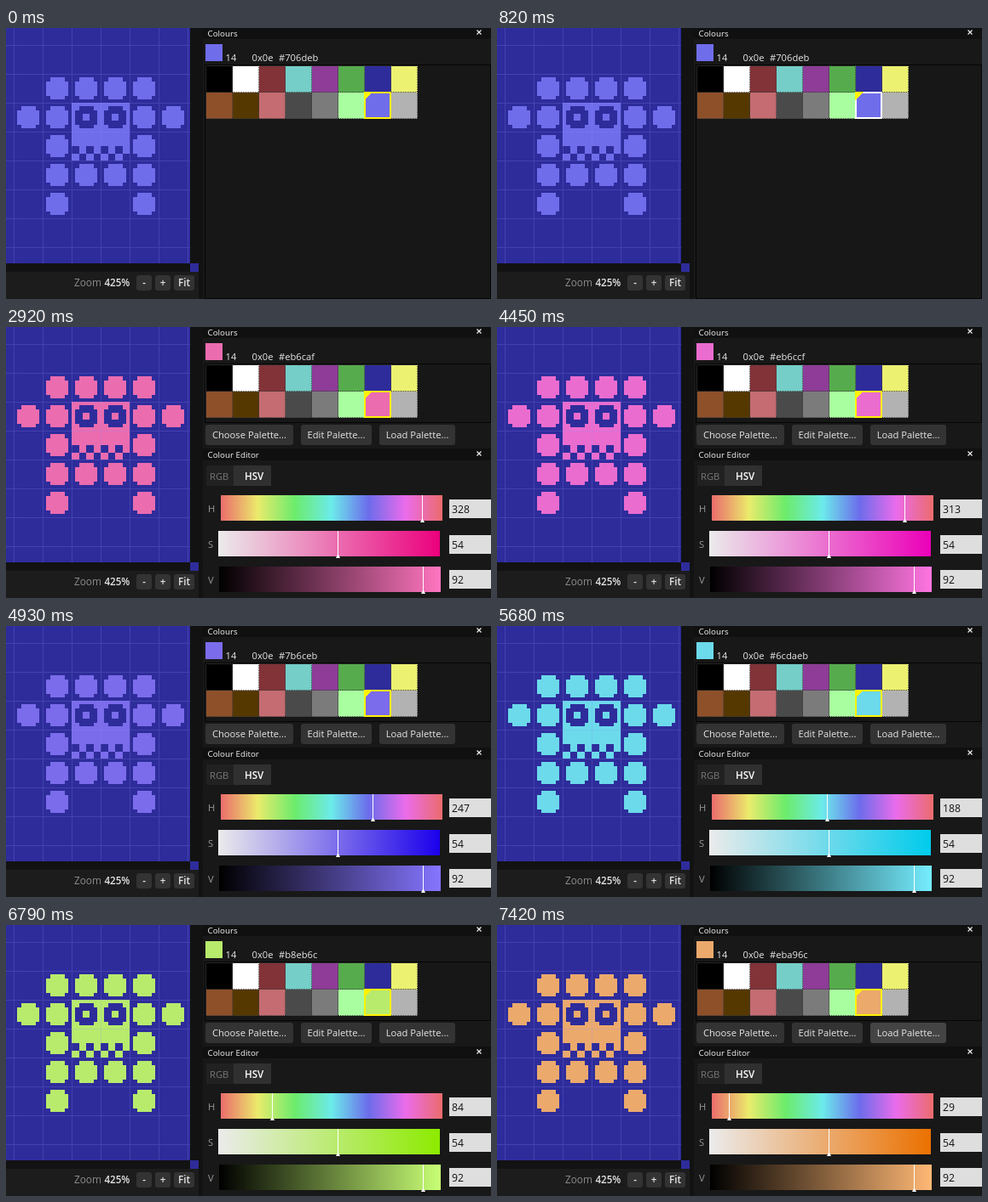
Recreate the animation shown at these times as an HTML page. Size 569x319 px, loop 8.89 s.

```html
<!DOCTYPE html>
<html lang="en">
<head>
<meta charset="utf-8">
<title>Palette editor</title>
<style>
html, body { margin: 0; width: 100%; height: 100%; overflow: hidden; background: #181818; }
svg { display: block; width: 100vw; height: 100vh; --c: #706deb; --pure: #0400eb; --bright: #7876ff; }
text { font: 11.2px "Open Sans", "Noto Sans", sans-serif; fill: #e6e6e6; white-space: pre; }
.title { font-size: 9.8px; fill: #f4f4f4; }
.strong { font-weight: 600; font-size: 11.6px; }
.dim { fill: #8c8c8c; font-size: 11.8px; }
.num { font-size: 12.2px; fill: #111; }
.ink { fill: var(--c); }
.btn { fill: #333; }
.btn.hover { fill: #444; }
.crisp { shape-rendering: crispEdges; }
</style>
</head>
<body>
<svg id="stage" viewBox="0 0 569 319" preserveAspectRatio="none">
  <defs>
    <linearGradient id="hueFill"></linearGradient>
    <linearGradient id="satFill">
      <stop stop-color="#ebebeb"/><stop offset="1" style="stop-color:var(--pure)"/>
    </linearGradient>
    <linearGradient id="valFill">
      <stop stop-color="#000"/><stop offset="1" style="stop-color:var(--bright)"/>
    </linearGradient>
  </defs>
  <rect width="569" height="319" fill="#181818"/>

  <g class="crisp">
    <rect width="231" height="287" fill="#121212"/>
    <rect width="216" height="277" fill="#2e2c9b"/>
    <rect x="216" y="277" width="10" height="10" fill="#2e2c9b"/>
    <g id="sprite"></g>
    <path id="grid" stroke="#8f8df0" stroke-opacity=".22" fill="none"/>
    <rect y="287" width="226" height="32" fill="#1c1c1c"/>
    <rect x="226" width="5" height="319" fill="#121212"/>
  </g>
  <text class="dim" x="80" y="304">Zoom</text>
  <text class="strong" x="115.5" y="304">425%</text>
  <g id="zoomButtons"></g>

  <rect x="231" width="338" height="13" fill="#101010"/>
  <text class="title" x="236.5" y="10">Colours</text>
  <path class="close" d="M552.5 2.5l5 5m0-5l-5 5" stroke="#eee" stroke-width="1.2"/>
  <rect id="chip" class="crisp" x="234" y="19" width="20" height="20"/>
  <text id="index" x="257.5" y="38.5"></text>
  <text id="code" x="288.5" y="38.5"></text>
  <text id="hex" x="320" y="38.5"></text>
  <rect id="list" x="233.5" y="43.5" width="335" height="275" fill="#171717" stroke="#050505"/>
  <g id="swatches" class="crisp"></g>
  <g id="pick" class="crisp">
    <rect x="1" y="1" width="30" height="30" fill="none" stroke="#fff200" stroke-width="2"/>
    <path d="M0 0h10L0 10z" fill="#fff200"/>
  </g>

  <g id="editor">
    <g id="paletteButtons"></g>
    <rect x="231" y="143" width="338" height="14" fill="#101010"/>
    <text class="title" x="236.5" y="154">Colour Editor</text>
    <path d="M552.5 146.500l5 5m0-5l-5 5" stroke="#eee" stroke-width="1.2"/>
    <rect x="235" y="163" width="32" height="24" fill="#212121"/>
    <rect x="267" y="163" width="44" height="24" fill="#303030"/>
    <text x="239" y="179.500" style="fill:#777">RGB</text>
    <text class="strong" x="280" y="179.500" style="fill:#fff">HSV</text>
    <g id="sliders"></g>
  </g>
</svg>
<script>
const LOOP = 8890, TICK = 30, SAT = .54, VAL = .92;
const $ = id => document.getElementById(id);

function add(parent, tag, attrs, text) {
  const el = document.createElementNS('http://www.w3.org/2000/svg', tag);
  for (const k in attrs) el.setAttribute(k, attrs[k]);
  if (text) el.textContent = text;
  return parent.appendChild(el);
}

function hsv(h, s, v) {
  const channel = n => {
    const k = (n + h / 60) % 6;
    const x = v * (1 - s * Math.max(0, Math.min(k, 4 - k, 1)));
    return Math.round(x * 255).toString(16).padStart(2, '0');
  };
  return '#' + channel(5) + channel(3) + channel(1);
}

// Sprite: 8-pixel cells, 34 units each
const PX = 4.25, CELL = 34, X0 = 9, Y0 = 54, sprite = $('sprite');
const block = (x, y, w, h, fill) => add(sprite, 'rect',
  { x, y, width: w * PX, height: h * PX, ...(fill ? { fill } : { class: 'ink' }) });
function ball(x, y, fill) {
  block(x + 2 * PX, y + PX, 4, 6, fill);
  block(x + PX, y + 2 * PX, 6, 4, fill);
}
['.oooo.', 'oo..oo', '.o..o.', '.oooo.', '.o..o.'].forEach((row, r) =>
  [...row].forEach((c, i) => c === 'o' && ball(X0 + i * CELL, Y0 + r * CELL)));
block(77, 88, 16, 12);
for (const x of [77, 111]) {
  ball(x, 88, '#2e2c9b');
  block(x + 3 * PX, 88 + 3 * PX, 2, 2);
}
for (let i = 0; i < 8; i++) block(77 + i * 2 * PX, i % 2 ? 139 : 147.5, 2, 2);

let lines = '';
for (let x = X0; x < 216; x += CELL) lines += `M${x + .5} 0V277`;
for (let y = Y0 - CELL; y < 277; y += CELL) lines += `M0 ${y + .5}H216`;
$('grid').setAttribute('d', lines);

function button(parent, x, y, w, h, label, cls = '') {
  const box = add(parent, 'rect', { class: 'btn', x, y, width: w, height: h, rx: 3 });
  add(parent, 'text', { class: cls, x: x + w / 2, y: y + h / 2 + 4, 'text-anchor': 'middle' }, label);
  return box;
}
button($('zoomButtons'), 153, 291, 18, 18, '-', 'strong');
button($('zoomButtons'), 175, 291, 18, 18, '+', 'strong');
button($('zoomButtons'), 197, 291, 24, 18, 'Fit', 'strong');
button($('paletteButtons'), 234, 115, 103, 24, 'Choose Palette...');
button($('paletteButtons'), 346, 115, 83, 24, 'Edit Palette...');
const loadButton = button($('paletteButtons'), 438, 115, 89, 24, 'Load Palette...');

const palette = ('000000 ffffff 813338 75cec8 8e3c97 56ac4d 2e2c9b edf171 ' +
  '8e5029 553800 c46c71 4a4a4a 7b7b7b a9ff9f 706deb b2b2b2').split(' ').map(c => '#' + c);
palette.forEach((c, i) => {
  const x = 234 + i % 8 * 31, y = 44 + (i >> 3) * 31;
  add($('swatches'), 'rect', { x: x + .5, y: y + .5, width: 31, height: 31,
    style: `fill:${i === 14 ? 'var(--c)' : c}`, stroke: '#3a3a3a', 'stroke-dasharray': '1 1' });
});

for (let i = 0; i <= 36; i++)
  add($('hueFill'), 'stop', { offset: i / 36, 'stop-color': hsv(i * 10 % 360, SAT, VAL) });

function slider(name, x, y, fill, boxY) {
  const g = $('sliders');
  add(g, 'text', { x: 237, y: y + 19.5, style: 'fill:#999' }, name);
  add(g, 'rect', { class: 'crisp', x, y, width: 260, height: 30, fill: `url(#${fill})` });
  const mark = add(g, 'path', { d: `M-.5 ${y}h1v${28}l2 4h-5l2-4z`, fill: '#fff' });
  add(g, 'rect', { class: 'crisp', x: 520, y: boxY, width: 49, height: 22, fill: '#dedede' });
  const num = add(g, 'text', { class: 'num', x: 523, y: boxY + 15.5 });
  return (part, value) => {
    mark.setAttribute('transform', `translate(${Math.floor(x + part * 260) + .5} 0)`);
    num.textContent = value;
  };
}
const setHue = slider('H', 252, 198, 'hueFill', 203);
slider('S', 249, 240, 'satFill', 245)(SAT, 54);
slider('V', 250, 282, 'valFill', 286)(VAL, 92);

// Hue drag: time, hue; equal neighbours are pauses
const drag = [[0, 241], [2890, 241], [2920, 328], [3700, 328], [3730, 327], [4240, 327],
  [4270, 324], [4450, 313], [4480, 311], [4720, 311], [4750, 300], [4930, 247], [5620, 191],
  [5650, 191], [5680, 188], [6520, 121], [6550, 119], [6580, 119], [6610, 115], [6790, 84],
  [6910, 84], [6940, 80], [7420, 29], [LOOP, 29]];

function hueAt(t) {
  const i = drag.findIndex(k => k[0] > t), [t0, a] = drag[i - 1], [t1, b] = drag[i];
  return Math.round(a + (b - a) * (t - t0) / (t1 - t0));
}

function draw(now) {
  const time = now % LOOP;
  const t = Math.max(0, Math.floor((time - 10) / TICK) * TICK + 10);
  const hue = hueAt(t), ink = t < 2920 ? palette[14] : hsv(hue, SAT, VAL);
  const style = $('stage').style;
  style.setProperty('--c', ink);
  style.setProperty('--pure', hsv(hue, 1, VAL));
  style.setProperty('--bright', hsv(hue, SAT, 1));
  setHue(hue / 360, hue);

  const sel = t >= 100 && t < 820 ? 15 : 14;
  const shown = sel === 14 ? ink : palette[sel];
  $('chip').setAttribute('fill', shown);
  $('index').textContent = sel;
  $('code').textContent = '0x0' + sel.toString(16);
  $('hex').textContent = shown;
  $('pick').setAttribute('transform', `translate(${234 + sel % 8 * 31} 75)`);
  $('pick').firstElementChild.setAttribute('stroke', t >= 100 && t < 1990 ? '#fff' : '#fff200');

  const open = t >= 1060;
  $('editor').style.display = open ? '' : 'none';
  $('list').setAttribute('height', open ? 69 : 275);
  loadButton.classList.toggle('hover', t >= 7420);
}

const start = performance.now();
function loop() {
  draw(performance.now() - start);
  requestAnimationFrame(loop);
}
loop();
</script>
</body>
</html>
```
